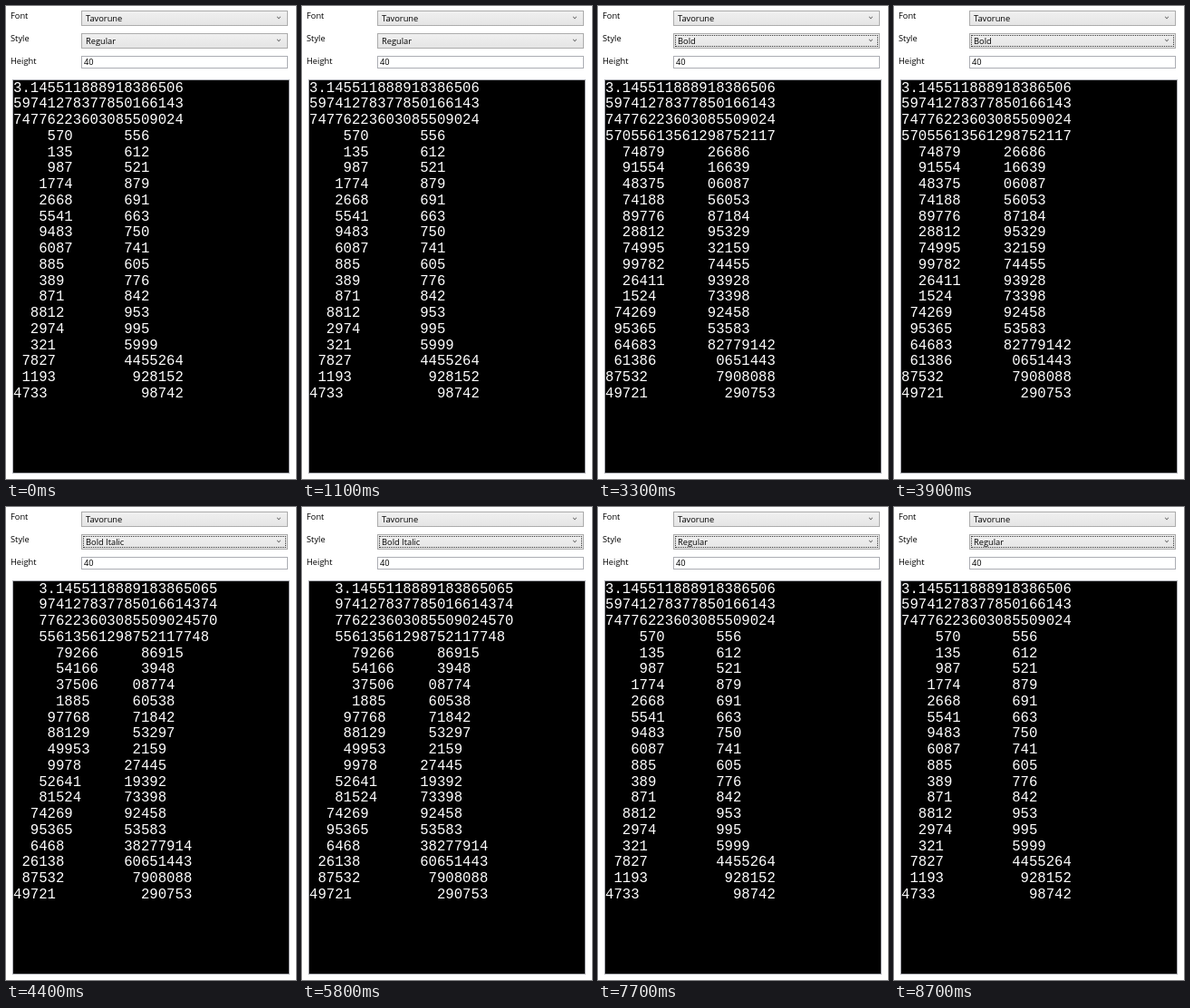
An HTML page that plays this animation: 320 by 522 pixels, repeating every 8800 ms.

```html
<!DOCTYPE html>
<html lang="en">
<head>
<meta charset="utf-8">
<title>Digits poured into a letter shape</title>
<style>
html, body { margin: 0; width: 100%; height: 100%; overflow: hidden; background: #fff; }
body { position: relative; font: 9.3px/14px "Open Sans", "Noto Sans", sans-serif; color: #000; }
body > * { position: absolute; box-sizing: border-box; white-space: pre; }
.label { left: 5px; }
.field { left: 83px; width: 228px; height: 17px; border: 1px solid #acacac; padding: 1px 0 0 4px; }
.combo { background: linear-gradient(#f0f0f0, #e5e5e5); }
.combo::after {
  content: ""; position: absolute; right: 7px; top: 4px; width: 3px; height: 3px;
  border: solid #606060; border-width: 0 1px 1px 0; transform: rotate(45deg) scale(.8);
}
.focused::before { content: ""; position: absolute; inset: 1px; border: 1px dotted #333; }
#height { top: 55px; height: 14px; padding: 0 0 0 2px; line-height: 12px; border-color: #abadb3; }
#digits {
  left: 7px; top: 81px; width: 306px; height: 435px; margin: 0; padding-top: .5px;
  border: 1px solid #abadb3; background: #000; color: #fff;
  font: 15.667px/17.75px "Liberation Mono", "Courier New", monospace;
}
</style>
</head>
<body>
<div class="label" style="top:4px">Font</div>
<div class="label" style="top:29px">Style</div>
<div class="label" style="top:54px">Height</div>
<div class="field combo" style="top:5px">Tavorune</div>
<div class="field combo" style="top:30px" id="style"></div>
<div class="field" id="height">40</div>
<pre id="digits"></pre>
<script>
const TEXT = "3.14551188891838650659741278377850166143747762236030855090245705561356129875211774"
  + "87926686915541663948375060877418856053897768718428812953297499532159997827445526411939281524"
  + "7339874269924589536553583646838277914261386065144387532790808849721290753";
const ROWS = 20;

// An edge is a start column and the rows where it moves: negative rows step left, positive step right.
// Each leg is a pair of edges; the foot widens the right leg to the given column.
const shapes = {
  "Regular": {
    barRows: 3, bar: [[0], [20]],
    left: [[4, -6, -14, -17, -19], [7, -11, -16, -19]],
    right: [[13, 18, 19], [16, 16]],
    foot: { row: 17, end: 20 }
  },
  "Bold": {
    barRows: 4, bar: [[0], [20]],
    left: [[2, -14, -18], [7, -13, -18]],
    right: [[12, 17, 19], [17]],
    foot: { row: 16, end: 20 }
  },
  "Bold Italic": {
    barRows: 4, bar: [[3], [24, -3]],
    left: [[5, -8, -12, -14, -17, -19], [10, -7, -11, -14, -16, -19]],
    right: [[15, -6, -11, 18, 19], [20, -5, -10]],
    foot: { row: 16, end: 21 }
  }
};

function columnAt([start, ...steps], row) {
  return steps.reduce((column, step) => Math.abs(step) <= row ? column + Math.sign(step) : column, start);
}

function spansAt({ barRows, bar, left, right, foot }, row) {
  const strokes = row < barRows ? [bar] : [left, right];
  const spans = strokes.map(edges => edges.map(edge => columnAt(edge, row)));
  if (row >= foot.row) spans[1][1] = foot.end;
  return spans;
}

function pour(shape) {
  let used = 0;
  const lines = [];
  for (let row = 0; row < ROWS; row++) {
    let line = "";
    for (const [start, end] of spansAt(shape, row)) {
      line = line.padEnd(start) + TEXT.slice(used, used += end - start);
    }
    lines.push(line);
  }
  return lines.join("\n");
}

const LOOP = 8800;
const FOCUS_AT = 2000;
const timeline = [
  [0, "Regular"], [2900, "Bold"], [4000, "Bold Italic"], [6500, "Bold"], [7700, "Regular"]
];
const styleBox = document.getElementById("style");
const digits = document.getElementById("digits");
let shown;

function draw(now) {
  const time = now % LOOP;
  const style = timeline.filter(([start]) => start <= time).pop()[1];
  if (style !== shown) {
    styleBox.textContent = shown = style;
    digits.textContent = pour(shapes[style]);
  }
  styleBox.classList.toggle("focused", time >= FOCUS_AT);
  requestAnimationFrame(draw);
}
draw(performance.now());
</script>
</body>
</html>
```
